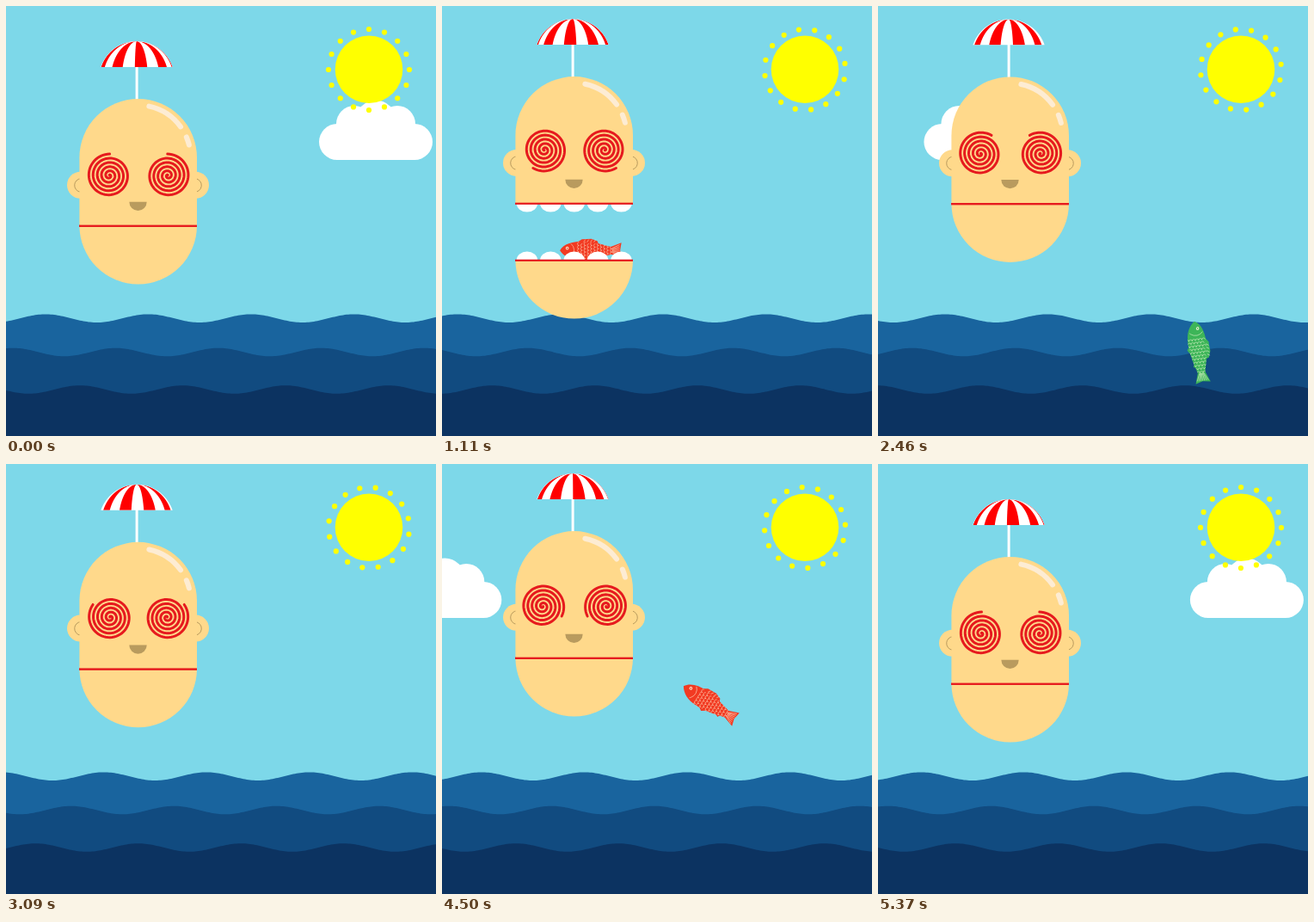
Animation, 500 px wide and 500 px high, one loop 5.4 s. Source, as an HTML page with a canvas:

```html
<!DOCTYPE html>
<html lang="en">
<head>
<meta charset="utf-8">
<title>Lunch at sea</title>
<style>
html, body { margin: 0; width: 100%; height: 100%; overflow: hidden; background: #7dd8e9; }
canvas { display: block; width: 500px; height: 500px; }
</style>
</head>
<body>
<canvas id="stage" width="500" height="500"></canvas>
<script>
const ctx = document.getElementById('stage').getContext('2d');
const TAU = Math.PI * 2;
const RAD = Math.PI / 180;
const LOOP = 5400, STEP = 30;
const CYCLE = 59.65;           // steps per bob of the head
const SPIN = 4.023;            // degrees per step
const WAVE = 119.5;            // wave length
const SKIN = '#ffd98b', RED = '#e61a1e';

// step at which each fish is clear of the water, and its colour
const FISH = [
  { at: 22.95, color: '#f23a22' },
  { at: 54.7, color: '#f59a38' },
  { at: 82, color: '#3db558' },
  { at: 112.2, color: '#d3de22' },
  { at: 142.2, color: '#f23a22' }
];

function disc(x, y, r, color) {
  ctx.fillStyle = color;
  ctx.beginPath();
  ctx.arc(x, y, r, 0, TAU);
  ctx.fill();
}

function strokeArc(x, y, r, a, b, width, color) {
  ctx.lineWidth = width;
  ctx.strokeStyle = color;
  ctx.beginPath();
  ctx.arc(x, y, r, a * RAD, b * RAD);
  ctx.stroke();
}

function smooth(a, b, v) {
  const k = Math.min(1, Math.max(0, (v - a) / (b - a)));
  return (1 - Math.cos(k * Math.PI)) / 2;
}

function drawCloud(n) {
  const span = 828.4;
  const x = ((364 - 13.89 * n + 132) % span + span) % span - 132;
  disc(x + 21, 158, 21, '#fff');
  disc(x + 41, 137, 21, '#fff');
  disc(x + 66, 132.5, 23, '#fff');
  disc(x + 91, 137, 21, '#fff');
  disc(x + 111, 158, 21, '#fff');
  ctx.fillRect(x + 21, 137, 90, 42);
}

function drawSun(n) {
  disc(422, 73.8, 39.3, '#ff0');
  for (let i = 0; i < 16; i++) {
    const a = (i * 22.5 + SPIN * n) * RAD;
    disc(422 + 47 * Math.cos(a), 74 + 47 * Math.sin(a), 3.1, '#ff0');
  }
}

function drawWave(n, y, crest, color) {
  const shift = crest - n * WAVE / 30;
  ctx.fillStyle = color;
  ctx.beginPath();
  ctx.moveTo(0, 500);
  for (let x = 0; x <= 500; x += 2) {
    ctx.lineTo(x, y - 4.8 * Math.cos(TAU * (x - shift) / WAVE));
  }
  ctx.lineTo(500, 500);
  ctx.fill();
}

function fishBody() {
  ctx.beginPath();
  ctx.moveTo(-36.5, 0);
  ctx.bezierCurveTo(-32, -8, -22, -10, -12, -10.5);
  ctx.bezierCurveTo(4, -10.5, 14, -6, 25, -4);
  ctx.lineTo(25, 4);
  ctx.bezierCurveTo(14, 7, 2, 11, -12, 11);
  ctx.bezierCurveTo(-24, 11, -32, 7, -36.5, 0);
}

function poly(points) {
  ctx.beginPath();
  points.forEach(([x, y]) => ctx.lineTo(x, y));
  ctx.closePath();
  ctx.fill();
}

function drawFish(v, color) {
  const x = Math.max(154, 373 - 1.01 * Math.max(0, v) ** 2);
  const fall = Math.min(v, 12.8);
  const y = 403 - 26.5 * fall + 1.345 * fall * fall;
  const turn = Math.max(0, Math.min(82, 82 - 6.3 * v));
  ctx.save();
  ctx.translate(x, y);
  ctx.rotate(turn * RAD);
  ctx.fillStyle = color;
  poly([[-17, -9], [-11, -13], [0, -13.5], [7, -11], [9, -6]]);
  poly([[-10, 9], [-4, 13], [2, 9]]);
  poly([[10, 6], [16, 8.5], [18, 4]]);
  poly([[22, -4], [35, -9], [33.5, 0], [36, 8.5], [22, 4]]);
  fishBody();
  ctx.fill();

  ctx.strokeStyle = 'rgba(255,255,225,.6)';
  ctx.lineWidth = 0.8;
  ctx.beginPath();
  for (let i = -3; i <= 3; i++) {
    ctx.moveTo(24, i * 0.8);
    ctx.lineTo(33, i * 2.2);
  }
  for (let i = 0; i < 4; i++) {
    ctx.moveTo(-9 + i * 4, -9.5);
    ctx.lineTo(-7 + i * 4, -12.5);
  }
  ctx.stroke();

  ctx.save();
  fishBody();
  ctx.clip();
  for (let c = 0; c < 11; c++) {
    for (let r = -2; r <= 3; r++) {
      strokeArc(-14 + c * 3.8, r * 3.8 + (c % 2) * 1.9, 2.1, 95, 265, 0.7, 'rgba(255,255,225,.6)');
    }
  }
  strokeArc(-30, 0, 10, -50, 50, 0.8, 'rgba(255,255,225,.6)');
  ctx.restore();
  disc(-28, -2.5, 1.8, '#fff6dc');
  disc(-28, -2.5, 0.9, color);
  ctx.restore();
}

// red gores turn round the pole in front of a white canopy
function drawUmbrella(n) {
  ctx.fillStyle = '#fff';
  ctx.fillRect(150.6, 68, 3, 41);
  ctx.save();
  ctx.translate(152, 85);
  ctx.beginPath();
  ctx.arc(0, 0, 44, Math.PI + 0.325, TAU - 0.325);
  ctx.closePath();
  ctx.fill();
  ctx.clip();
  ctx.fillStyle = '#f00';
  const turn = (7 + SPIN * n) % 40;
  const limit = deg => Math.sin(Math.max(-90, Math.min(90, deg)) * RAD);
  for (let mid = turn - 120; mid <= 120; mid += 40) {
    const a = limit(mid - 10), b = limit(mid + 10);
    ctx.beginPath();
    for (let y = -44; y <= -14; y++) ctx.lineTo(a * Math.sqrt(1936 - y * y), y);
    for (let y = -14; y >= -44; y--) ctx.lineTo(b * Math.sqrt(1936 - y * y), y);
    ctx.fill();
  }
  ctx.restore();
}

function drawEye(x, side, n) {
  ctx.save();
  ctx.translate(x, 195.3);
  ctx.scale(side, 1);
  ctx.rotate(-SPIN * n * RAD);
  ctx.translate(1, 1.8);
  ctx.rotate(-89 * RAD);
  ctx.strokeStyle = RED;
  ctx.lineWidth = 3;
  ctx.lineCap = 'round';
  ctx.beginPath();
  for (let a = 0; a <= 5 * 360; a += 6) {
    const r = 25 - a / 360 * 4.9;
    ctx.lineTo(r * Math.cos(a * RAD), -r * Math.sin(a * RAD));
  }
  ctx.stroke();
  ctx.restore();
}

function drawTeeth(y, from, to) {
  ctx.fillStyle = '#fff';
  for (let i = -2; i <= 2; i++) {
    ctx.beginPath();
    ctx.ellipse(153.7 + i * 27.4, y, 12.2, 10, 0, from, to);
    ctx.fill();
  }
}

function drawLip(y) {
  ctx.fillStyle = RED;
  ctx.fillRect(85, y, 137, 2.2);
}

function drawEar(x, side) {
  disc(x, 208.3, 15.5, SKIN);
  ctx.lineCap = 'butt';
  strokeArc(x - side, 208.5, 7.8, side > 0 ? -85 : 95, side > 0 ? 95 : 265, 1, '#b99b5e');
}

function drawHead(n, drop) {
  const cx = 153.7, r = 68.3;
  ctx.save();
  ctx.translate(0, 15 * Math.cos(TAU * n / CYCLE) - 15);
  drawUmbrella(n);
  if (drop > 0) {
    drawTeeth(255.5, 0, Math.PI);
    drawTeeth(255.5 + drop, Math.PI, TAU);
  }
  drawEar(86.5, -1);
  drawEar(220.5, 1);

  // jaw
  ctx.fillStyle = SKIN;
  ctx.beginPath();
  ctx.arc(cx, 255.2 + drop, r, 0, Math.PI);
  ctx.fill();
  drawLip(254.6 + drop);

  // skull
  ctx.fillStyle = SKIN;
  ctx.beginPath();
  ctx.arc(cx, 176.3, r, Math.PI, TAU);
  ctx.lineTo(cx + r, 255.5);
  ctx.lineTo(cx - r, 255.5);
  ctx.fill();
  drawLip(254.6);
  ctx.lineCap = 'round';
  strokeArc(cx, 176.3, 61, -78, -36, 6, '#fdecd3');
  strokeArc(cx, 176.3, 61, -23, -14, 6, '#fdecd3');

  drawEye(119.1, 1, n);
  drawEye(189.2, -1, n);
  ctx.fillStyle = '#b99b5e';
  ctx.beginPath();
  ctx.arc(153.5, 227.7, 10.2, 0, Math.PI);
  ctx.fill();
  ctx.restore();
}

function draw(n) {
  ctx.fillStyle = '#7dd8e9';
  ctx.fillRect(0, 0, 500, 500);
  drawCloud(n);
  drawSun(n);
  drawWave(n, 363.2, 46, '#19649e');
  drawWave(n, 402.5, 8, '#114b80');

  let drop = 0;
  for (const f of FISH) {
    const v = n - f.at;
    if (v > -4 && v < 16.6) drawFish(v, f.color);
    drop += 76 * smooth(8.2, 12.4, v) * (1 - smooth(13.2, 16.8, v));
  }
  drawWave(n, 446, 86, '#0c3361');
  drawHead(n, drop);
}

const start = performance.now();
function tick() {
  const t = (performance.now() - start) % LOOP;
  draw(Math.floor(t / STEP));
  requestAnimationFrame(tick);
}
tick();
</script>
</body>
</html>
```
